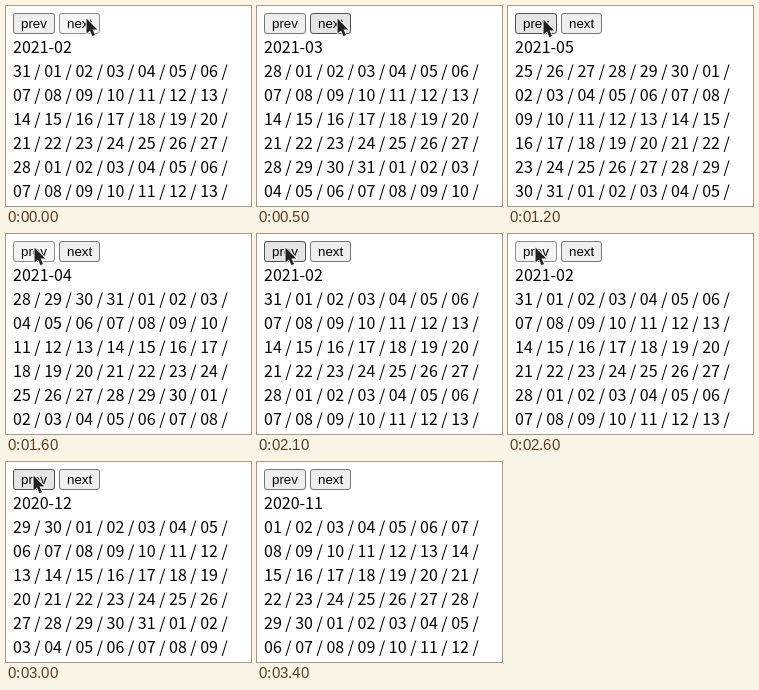
Recreate the animation shown at these times as an HTML page. Size 245 px wide and 200 px high, loop 3800 ms.

```html
<!DOCTYPE html>
<html lang="en">
<head>
<meta charset="utf-8">
<title>Month calendar</title>
<style>
  html, body { margin: 0; width: 100%; height: 100%; overflow: hidden; background: #fff; }
  #stage { position: relative; width: 245px; height: 200px; overflow: hidden; color: #000; }
  .btn {
    position: absolute; top: 7px; height: 21px; box-sizing: border-box;
    border: 1px solid #767676; border-radius: 3px; background: #efefef;
    padding: 2px 0 0 7px; white-space: nowrap;
    font: 13.3333px/15px "Liberation Sans", Arial, sans-serif;
  }
  .hover { background: #e5e5e5; border-color: #4f4f4f; }
  .active { background: #f5f5f5; border-color: #8d8d8d; }
  #prev { left: 7px; width: 42px; }
  #next { left: 53px; width: 41px; }
  #text {
    position: absolute; left: 7px; top: 28px; white-space: pre;
    font: 16px/24px "Noto Sans CJK JP", "Noto Sans CJK SC", "Noto Sans CJK", sans-serif;
  }
  #cursor { position: absolute; left: 0; top: 0; overflow: visible; }
</style>
</head>
<body>
<div id="stage">
  <div class="btn" id="prev">prev</div>
  <div class="btn" id="next">next</div>
  <div id="text"></div>
  <svg id="cursor" width="14" height="22">
    <path d="M0.5 0.5V15.5L4 12.4L6.5 18.2L9 17.1L6.5 11.4H11.3Z"
      fill="#222" stroke="#fff" stroke-width="1.6" stroke-linejoin="round" paint-order="stroke"/>
  </svg>
</div>
<script>
  const LOOP = 3800;
  // time, month of 2021, button, state, pointer x, pointer y
  const steps = [
    [0, 2, "next", "active", 81, 12],
    [100, 2, "next", "hover", 81, 12],
    [400, 2, "next", "active", 81, 12],
    [500, 3, "next", "hover", 81, 12],
    [600, 3, "next", "active", 81, 12],
    [700, 4, "next", "hover", 81, 12],
    [900, 4, "next", "active", 81, 12],
    [1000, 5, "next", "hover", 81, 12],
    [1100, 5, "next", "hover", 62, 13],
    [1200, 5, "prev", "hover", 36, 13],
    [1300, 5, "prev", "active", 29, 13],
    [1500, 4, "prev", "hover", 29, 13],
    [1600, 4, "prev", "active", 29, 13],
    [1900, 3, "prev", "hover", 29, 13],
    [2100, 2, "prev", "hover", 29, 13],
    [2200, 2, "prev", "hover", 29, 14],
    [2400, 2, "prev", "hover", 28, 14],
    [2500, 2, "prev", "hover", 28, 13],
    [2600, 2, "prev", "active", 28, 13],
    [2700, 1, "prev", "hover", 28, 13],
    [2800, 1, "prev", "active", 28, 13],
    [3000, 0, "prev", "hover", 28, 13],
    [3100, 0, "prev", "active", 28, 13],
    [3300, -1, "prev", "hover", 28, 13],
    [3400, -1]
  ];
  const el = id => document.getElementById(id);
  const text = el("text"), cursor = el("cursor");
  const buttons = [el("prev"), el("next")];
  const pad = n => String(n).padStart(2, "0");

  // Six weeks, starting on the Sunday on or before the first
  function calendar(month) {
    const first = new Date(Date.UTC(2021, month - 1, 1));
    const year = first.getUTCFullYear(), m = first.getUTCMonth();
    const lines = [year + "-" + pad(m + 1)];
    for (let week = 0; week < 6; week++) {
      let line = "";
      for (let day = 0; day < 7; day++) {
        const date = 1 - first.getUTCDay() + week * 7 + day;
        line += pad(new Date(Date.UTC(year, m, date)).getUTCDate()) + " / ";
      }
      lines.push(line);
    }
    return lines.join("\n");
  }

  let shown = null;
  function show(step) {
    if (step === shown) return;
    shown = step;
    const [, month, target, state, x, y] = step;
    text.textContent = calendar(month);
    for (const b of buttons) b.className = b.id === target ? "btn " + state : "btn";
    cursor.style.display = target ? "block" : "none";
    if (target) cursor.style.transform = `translate(${x - 1}px, ${y}px)`;
  }

  function frame() {
    const t = performance.now() % LOOP;
    show(steps.filter(s => s[0] <= t).pop());
    requestAnimationFrame(frame);
  }
  frame();
</script>
</body>
</html>
```
